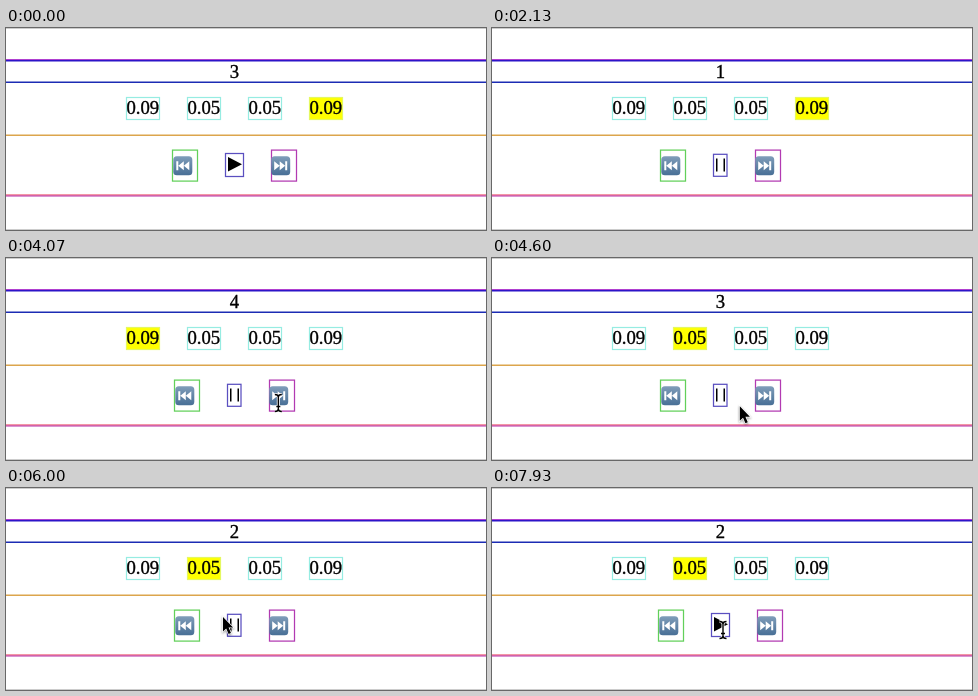
An HTML page for the animation above (8 s loop, 480x202 px).

```html
<!DOCTYPE html>
<html lang="en">
<head>
<meta charset="utf-8">
<title>Interval timer</title>
<style>
  html, body { margin: 0; width: 100%; height: 100%; overflow: hidden; background: #fff; }
  svg { display: block; width: 480px; height: 202px; }
  text { font: 18.7px "Liberation Serif", serif; text-anchor: middle; stroke: #000; stroke-width: .35; }
  .box { fill: none; stroke-width: 1.25; }
  #items rect { fill: none; stroke: #96ece2; stroke-width: 1.2; }
  #items .active { fill: #ff0; stroke: #e4f860; }
  #arrow { filter: drop-shadow(.5px 1px .8px #0006); }
</style>
</head>
<body>
<svg viewBox="0 0 480 202">
  <defs>
    <linearGradient id="key" x2="0" y2="1">
      <stop stop-color="#7f9db9"/><stop offset="1" stop-color="#486f96"/>
    </linearGradient>
    <g id="skip">
      <rect x="-9.5" y="-9.5" width="19" height="19" rx="3.5" fill="url(#key)"/>
      <path d="M-6.5-4.5h2v9h-2zM1-4.5v9L-4.5 0zM6.5-4.5v9L1 0z" fill="#fff"/>
    </g>
    <path id="stem" fill="none"
          d="M-3.5-8.5Q0-8.5 0-6V6Q0 8.5-3.5 8.5M3.5-8.5Q0-8.5 0-6M0 6Q0 8.5 3.5 8.5M-2 3.5H2"/>
  </defs>

  <path d="M0 .5H480M0 201.5H480" stroke="#ccc"/>
  <path d="M0 31.5H480" stroke="#b040d0"/>
  <path d="M0 32.7H480" stroke="#2c14c8" stroke-width="1.4"/>
  <path d="M0 54.3H480" stroke="#1c2cb4" stroke-width="1.4"/>
  <path d="M0 107.3H480" stroke="#dca54c" stroke-width="1.4"/>
  <path d="M0 167H480" stroke="#e8304c" stroke-width="1.2"/>
  <path d="M0 168H480" stroke="#b42ca8"/>

  <text id="count" x="228.5" y="49.5"></text>
  <g id="items"></g>

  <g id="prev">
    <rect class="box" x="166.5" y="122.1" width="25" height="31" stroke="#62d05a"/>
    <use href="#skip" x="176.8" y="137.8"/>
  </g>
  <g id="next">
    <rect class="box" x="265.5" y="122.1" width="25" height="31" stroke="#b23ab2"/>
    <use href="#skip" transform="translate(274.7 137.8) scale(-1 1)"/>
  </g>
  <g id="play">
    <rect class="box" x="219.5" y="125.5" width="18" height="23" stroke="#5a4fc0"/>
    <path d="M222 129v14.5L236 136.2z"/>
  </g>
  <g id="pause">
    <rect class="box" x="221.5" y="126.3" width="13.5" height="22" stroke="#5a4fc0"/>
    <path d="M224 130.5h1.5v13H224zM231.5 130.5h1.5v13h-1.5z"/>
  </g>

  <path id="arrow" d="M0 0v14.4l3.2-3 2.4 5.5 2.4-1-2.4-5.4h4.5z"
        stroke="#fff" stroke-width="1.4" paint-order="stroke"/>
  <g id="beam">
    <use href="#stem" stroke="#fff" stroke-width="3"/>
    <use href="#stem" stroke="#000" stroke-width="1.4"/>
  </g>
</svg>
<script>
const LOOP = 8000, PLAY = 930, SKIP = 4470, HALT = 6270, TICK = 1035;
const durations = ['0.09', '0.05', '0.05', '0.09'];
const secondsOf = item => Math.floor(durations[item] * 60);

const $ = id => document.getElementById(id);
const show = (el, on) => el.setAttribute('display', on ? 'inline' : 'none');
const move = (el, x, y) => el.setAttribute('transform', `translate(${x} ${y})`);
const smooth = k => k * k * (3 - 2 * k);

$('items').innerHTML = durations.map((label, i) => {
  const x = 120.5 + 61 * i;
  return `<rect x="${x}" y="69.5" width="33" height="22"/>
    <text x="${x + 16.3}" y="86.3">${label}</text>`;
}).join('');
const itemBoxes = [...$('items').querySelectorAll('rect')];

// Counts down, moving on to the next item at zero; SKIP jumps ahead at once.
function timerAt(t) {
  let item = 3, left = 3;
  const advance = () => {
    item = (item + 1) % durations.length;
    left = secondsOf(item);
  };
  const run = (from, until) => {
    for (let tick = from; tick <= t && tick < until; tick += TICK)
      if (--left < 1) advance();
  };
  run(PLAY, SKIP);
  if (t >= SKIP) advance();
  run(SKIP + TICK, HALT);
  return { item, left };
}

const CENTER = [231, 142], NEXT = [274, 142];
const glide = (from, to, start, end) => ({ from, to, start, end });
const visits = [
  { enter: 70, leave: 1470, home: [268, 185], glides: [
    glide(70, 530, ...CENTER), glide(1380, 1400, 229, 151)] },
  { enter: 3400, leave: LOOP, home: [250, 185], glides: [
    glide(3400, 4200, ...NEXT), glide(SKIP, 5000, 103, 183),
    glide(5400, 6000, 217, 129), glide(6000, 6200, ...CENTER),
    glide(HALT, 6670, 236, 182), glide(6930, 7600, ...CENTER)] }
];

function pointerAt(t) {
  const visit = visits.find(v => t >= v.enter && t < v.leave);
  return visit && visit.glides.reduce(([x, y], { from, to, start, end }) => {
    const k = smooth(Math.min(1, Math.max(0, (t - from) / (to - from))));
    return [x + (start - x) * k, y + (end - y) * k];
  }, visit.home);
}

// The pointer turns into a text beam above button labels.
const overLabel = ([x, y]) => y > 128 && y < 148 &&
  [177, 228.5, 274].some(middle => Math.abs(x - middle) < 9);

function draw(t) {
  const { item, left } = timerAt(t);
  $('count').textContent = left;
  itemBoxes.forEach((box, i) => box.classList.toggle('active', i === item));

  const running = t >= PLAY && t < HALT;
  show($('play'), !running);
  show($('pause'), running);
  move($('prev'), running ? 2 : 0, 0);
  move($('next'), running ? -2 : 0, 0);

  const pointer = pointerAt(t);
  const beam = pointer && overLabel(pointer);
  show($('arrow'), pointer && !beam);
  show($('beam'), beam);
  if (pointer) move($(beam ? 'beam' : 'arrow'), ...pointer);
}

const begin = performance.now();
function frame() {
  draw((performance.now() - begin) % LOOP);
  requestAnimationFrame(frame);
}
frame();
</script>
</body>
</html>
```
